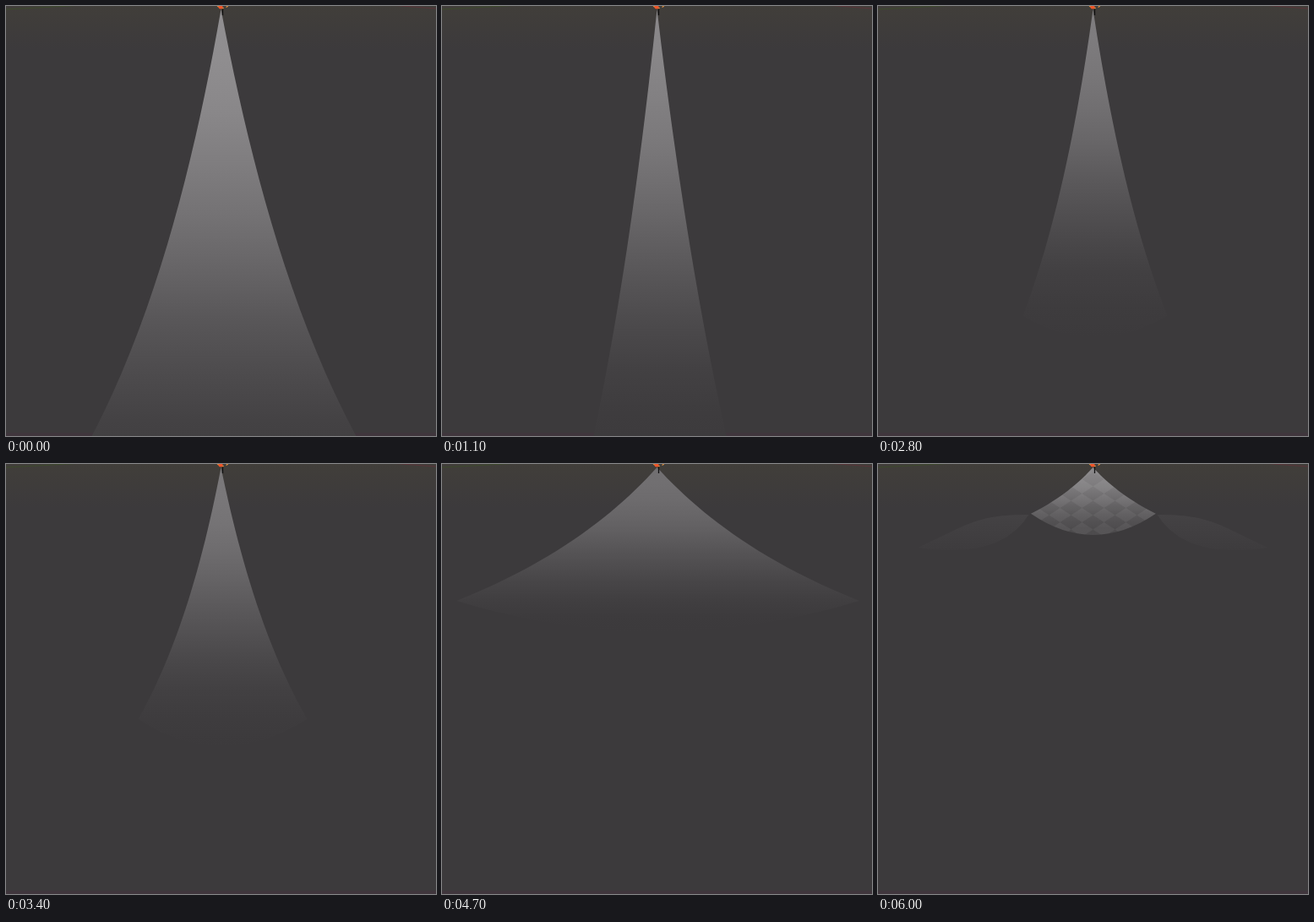
Recreate the animation shown at these times as an HTML page with a canvas. Size 509x509 px, loop 6.1 s.

```html
<!DOCTYPE html>
<html>
<head>
<meta charset="utf-8">
<style>
html, body { margin: 0; width: 100%; height: 100%; overflow: hidden; background: #3c3a3c; }
canvas { display: block; }
</style>
</head>
<body>
<canvas id="stage" width="509" height="509"></canvas>
<script>
const ctx = document.getElementById('stage').getContext('2d');
const SIZE = 509, CX = 254.5, APEX = 4, LEAN = .007;
const LOOP = 6100, STEP = 100, BASE = 60;

const clamp01 = v => Math.max(0, Math.min(1, v));
const grey = g => `rgb(${g},${g - 2},${g})`;

// The sheet narrows, holds, then opens steadily while its hem rises
function sheetAt(t) {
  const narrowing = 5.5 + 3.8 * Math.sin(Math.PI / 2 * Math.min(1, t / 1500));
  const opening = Math.max(1.1, 6.9 - .0031 * (t - 2800));
  const bottom = 612 - .088 * t + 28 * Math.sin(Math.PI * Math.min(1, t / 4700));
  const lit = clamp01((t - 4700) / 1300);
  return {
    bottom, lit,
    steepness: Math.min(narrowing, opening),
    flare: Math.min(.5, .22 + .28 * Math.exp(-t / 250) + .00007 * t),
    hem: bottom * (1 - .3 * (t / 6000) ** 2),
    light: 85 - .0065 * t + 34 * lit
  };
}

function halfWidth(sheet, y) {
  const d = y - APEX;
  return d / (sheet.steepness * (1 - sheet.flare * d / sheet.bottom));
}

function line(x1, y1, x2, y2, color, width = 1) {
  ctx.strokeStyle = color;
  ctx.lineWidth = width;
  ctx.beginPath();
  ctx.moveTo(x1, y1);
  ctx.lineTo(x2, y2);
  ctx.stroke();
}

function fade(y1, y2, shadeAt, count = 1) {
  const g = ctx.createLinearGradient(0, y1, 0, y2);
  for (let i = 0; i <= count; i++) g.addColorStop(i / count, shadeAt(i / count));
  return g;
}

function drawBackground() {
  ctx.fillStyle = grey(BASE);
  ctx.fillRect(0, 0, SIZE, SIZE);
  ctx.fillStyle = fade(0, 52, s => s ? grey(BASE) : '#413e3a');
  ctx.fillRect(0, 0, SIZE, 52);
  ctx.fillStyle = '#40363d';
  ctx.fillRect(0, 505, SIZE, 4);
  line(0, 4, 92, -1, '#3d4a2c');
  line(455, -1, SIZE, 3, '#5a3439');
}

function drawWings(alpha) {
  ctx.globalAlpha = alpha;
  ctx.fillStyle = fade(60, 106, s => grey(68 - 7 * s));
  for (const side of [-1, 1]) {
    const x = w => CX + side * w;
    ctx.beginPath();
    ctx.moveTo(x(76), 60);
    ctx.bezierCurveTo(x(140), 60, x(150), 73, x(207), 99);
    ctx.quadraticCurveTo(x(110), 114, x(76), 60);
    ctx.fill();
  }
  ctx.globalAlpha = 1;
}

// Diamond-shaped mesh faces
function drawFacets(alpha) {
  const w = 13, h = 8.5;
  ctx.globalAlpha = alpha * .035;
  for (let row = 0; row < 9; row++) {
    ctx.fillStyle = row & 1 ? '#fff' : '#000';
    for (let col = -6 + (row & 1); col <= 6; col += 2) {
      const x = CX + col * w, y = 18 + row * h;
      ctx.beginPath();
      ctx.moveTo(x, y - h);
      ctx.lineTo(x + w, y);
      ctx.lineTo(x, y + h);
      ctx.lineTo(x - w, y);
      ctx.fill();
    }
  }
  ctx.globalAlpha = 1;
}

function drawSheet(sheet) {
  const { bottom, hem, light, lit } = sheet, pieces = 24;
  const floor = 20 * lit;
  const edgePoint = (side, s) => {
    const y = APEX + (hem - APEX) * s;
    return [CX + LEAN * (y - APEX) + side * halfWidth(sheet, y), y];
  };

  ctx.save();
  ctx.beginPath();
  ctx.moveTo(CX, APEX);
  for (let i = 1; i <= pieces; i++) ctx.lineTo(...edgePoint(1, i / pieces));
  ctx.quadraticCurveTo(CX, 2 * bottom - hem, ...edgePoint(-1, 1));
  for (let i = pieces - 1; i > 0; i--) ctx.lineTo(...edgePoint(-1, i / pieces));
  ctx.closePath();
  ctx.fillStyle = fade(APEX, bottom, s =>
    grey(BASE + floor + (light - floor) * (1 + Math.cos(Math.PI * s)) / 2), 10);
  ctx.fill();
  ctx.clip();
  if (lit) drawFacets(lit);
  ctx.restore();
}

function drawOrigin() {
  line(256.5, 2, 256.5, 11, '#111', 1.3);
  ctx.setLineDash([3, 3]);
  ctx.lineWidth = 1.3;
  ctx.strokeStyle = '#e8953f';
  ctx.beginPath();
  ctx.arc(256.5, -6, 8.5, 0, Math.PI);
  ctx.stroke();
  ctx.setLineDash([]);
  ctx.fillStyle = '#f0552a';
  ctx.beginPath();
  ctx.arc(254, 1, 2.5, 0, 7);
  ctx.fill();
}

function frame(now) {
  const t = Math.floor(now % LOOP / STEP) * STEP;
  drawBackground();
  drawWings(clamp01((t - 5000) / 1000));
  drawSheet(sheetAt(t));
  drawOrigin();
  requestAnimationFrame(frame);
}
requestAnimationFrame(frame);
</script>
</body>
</html>
```
